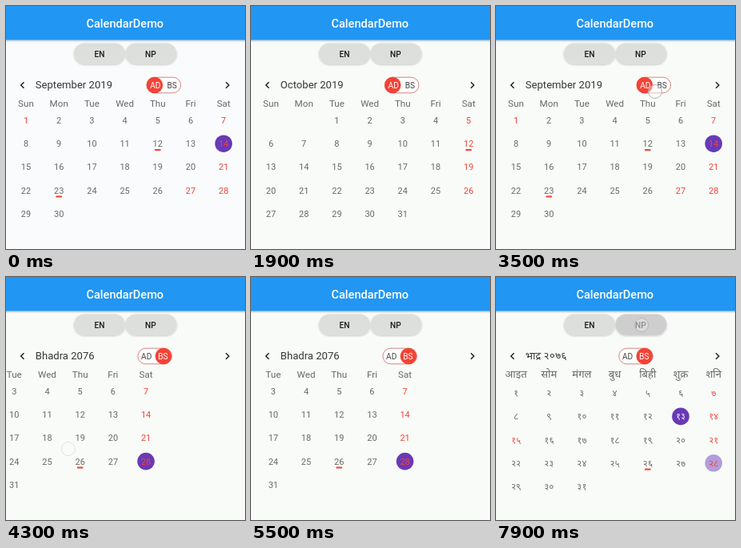
An HTML page for the animation above (8000 ms loop, 299 px wide and 304 px high).

```html
<!DOCTYPE html>
<html lang="en">
<head>
<meta charset="utf-8">
<title>Calendar</title>
<style>
  html, body { margin: 0; width: 100%; height: 100%; overflow: hidden; }
  svg { display: block; width: 299px; height: 304px; }
  text { font-family: Roboto, "Noto Sans Devanagari", "Noto Sans", sans-serif; }
</style>
</head>
<body>
<svg viewBox="0 0 299 304" xmlns="http://www.w3.org/2000/svg">
  <defs>
    <linearGradient id="shade" x2="0" y2="1">
      <stop stop-color="#000" stop-opacity=".2"/>
      <stop offset="1" stop-color="#000" stop-opacity="0"/>
    </linearGradient>
    <filter id="lift" x="-10%" y="-20%" width="120%" height="160%">
      <feDropShadow dx="0" dy=".9" stdDeviation=".8" flood-opacity=".24"/>
    </filter>
  </defs>
  <rect id="back" width="299" height="304"/>
  <rect y="42.6" width="299" height="3" fill="url(#shade)"/>
  <rect width="299" height="42.6" fill="#2196f3"/>
  <text x="148.8" y="27" text-anchor="middle" font-size="14.6" font-weight="500" fill="#fff">CalendarDemo</text>
  <g filter="url(#lift)">
    <rect x="85" y="46.5" width="64" height="26.2" rx="13.1" fill="#dddfdc"/>
    <rect id="np" x="149.5" y="46.5" width="64" height="26.2" rx="13.1"/>
  </g>
  <g font-size="10.2" font-weight="500" text-anchor="middle" fill="#1c1c1c">
    <text x="117" y="63.6">EN</text>
    <text id="npLabel" x="181" y="63.6">NP</text>
  </g>
  <path d="M22.5 95.2 18.7 99l3.8 3.8M275.1 95.2l3.8 3.8-3.8 3.8" fill="none" stroke="#1c1c1c" stroke-width="1.4"/>
  <text id="title" x="36.8" y="103.2" font-size="13.1" fill="#363636"></text>
  <g id="toggle" font-size="10.2" text-anchor="middle">
    <rect x=".5" y="89.2" width="42.5" height="19.6" rx="9.8" fill="#fff" stroke="#d4786d" stroke-width=".9"/>
    <circle id="knob" cy="99" r="10.3" fill="#f44336"/>
    <text id="ad" x="11.3" y="102.7">AD</text>
    <text id="bs" x="32" y="102.7">BS</text>
  </g>
  <g id="page" text-anchor="middle"></g>
  <circle id="touch" r="8.5" fill="#fff" fill-opacity=".4" stroke="#a9a9b4" stroke-width=".9"/>
</svg>
<script>
const LOOP = 8000, STEP = 100, WIDTH = 299, RED = '#f44336', GREY = '#686868';
const $ = id => document.getElementById(id);
const DAYS = {
  en: ['Sun', 'Mon', 'Tue', 'Wed', 'Thu', 'Fri', 'Sat'],
  np: ['आइत', 'सोम', 'मंगल', 'बुध', 'बिही', 'शुक्र', 'शनि']
};
const AD = [
  { en: 'September 2019', first: 0, days: 30, off: [1, 27], events: [12, 23], today: 14 },
  { en: 'October 2019', first: 2, days: 31, off: [], events: [12] }
];
const BS = [
  { en: 'Bhadra 2076', np: 'भाद्र २०७६', first: 0, days: 31, off: [15], events: [26], today: 28 },
  { en: 'Ashwin 2076', first: 3, days: 30, off: [10], events: [6, 25] }
];

// turn: +1 to the next page, -1 back; hold: how long the finger rests first
const SWIPES = [
  { start: 1300, time: 525, turn: 1, x: 152, y: 224, hold: 0 },
  { start: 2230, time: 600, turn: -1, x: 152, y: 187, hold: 50 },
  { start: 4100, time: 525, turn: 1, x: 152, y: 215, hold: 0 },
  { start: 5070, time: 650, turn: -1, x: 152, y: 205, hold: 200 }
];
const columnX = i => 25 + i * 41.2;
const rowY = i => 143 + i * 29.2;
const TAPS = {
  calendar: { start: 3500, x: 199, y: 107 },
  thursday: { start: 6100, x: columnX(4), y: rowY(3) },
  friday: { start: 6700, x: columnX(5), y: rowY(1) },
  language: { start: 7800, x: 182, y: 60 }
};

const clamp = v => Math.min(1, Math.max(0, v));
const smooth = v => (v = clamp(v)) * v * (3 - 2 * v);
const tapped = (tap, t) => t >= tap.start + STEP;
const digits = (n, lang) => lang === 'np'
  ? String(n).replace(/\d/g, d => String.fromCharCode(0x966 + +d)) : n;
const label = (x, y, size, fill, words) =>
  `<text x="${x}" y="${y}" font-size="${size}" fill="${fill}">${words}</text>`;
const set = (id, attributes) =>
  Object.entries(attributes).forEach(([name, value]) => $(id).setAttribute(name, value));

function monthMarkup(month, picked, lang) {
  const nepali = lang === 'np';
  let out = DAYS[lang].map((d, i) => label(columnX(i), 126, nepali ? 13.1 : 11.65, GREY, d)).join('');
  for (let day = 1; day <= month.days; day++) {
    const cell = day - 1 + month.first, x = columnX(cell % 7);
    const y = rowY(Math.floor(cell / 7)) + (nepali ? 2.2 : 0);
    const chosen = day === picked;
    const holiday = cell % 7 === 6 || month.off.includes(day);
    if (chosen || day === month.today)
      out += `<circle cx="${x}" cy="${y}" r="10.8" fill="${chosen ? '#673ab7' : '#b39ddb'}"/>`;
    if (month.events.includes(day))
      out += `<rect x="${x - 3.7}" y="${y + 6.8}" width="7.4" height="2.1" fill="${RED}"/>`;
    out += label(x, y + 3.9, 11, holiday ? RED : chosen ? '#fff' : GREY, digits(day, lang));
  }
  return out;
}

function fingerAt(t) {
  const tap = Object.values(TAPS).find(p => t >= p.start && t < p.start + 200);
  if (tap) return { x: tap.x, y: tap.y, opacity: 1 - (t - tap.start) / 300 };
  const swipe = SWIPES.find(s => t > s.start - s.hold && t < s.start + 300);
  if (!swipe) return null;
  const k = clamp((t - swipe.start) / 300);
  const reach = swipe.turn > 0 ? -100 : 197;
  return { x: swipe.x + reach * smooth(k), y: swipe.y, opacity: 1 - k };
}

function draw(t) {
  const pressed = t >= TAPS.language.start;
  const lang = tapped(TAPS.language, t) ? 'np' : 'en';
  set('back', { fill: t < 200 ? '#fafbfc' : '#f9fbf8' });
  set('np', { fill: pressed ? '#cecece' : '#dddfdc' });
  set('npLabel', { fill: pressed ? '#686868' : '#1c1c1c' });

  const progress = SWIPES.reduce((sum, s) => sum + s.turn * smooth((t - s.start) / s.time), 0);
  const index = Math.round(progress);
  const side = clamp((t - TAPS.calendar.start) / 200);
  const month = (side < 1 ? AD : BS)[index];
  const picked = tapped(TAPS.friday, t) ? 13 : tapped(TAPS.thursday, t) ? 26 : month.today;

  $('title').textContent = month[lang];
  const titleEnd = 37 + $('title').getComputedTextLength();
  set('toggle', { transform: `translate(${titleEnd / 2 + 109} 0)` });
  set('knob', { cx: 10.3 + 22.2 * side });
  set('ad', { fill: side < .5 ? '#fff' : '#444' });
  set('bs', { fill: side < .5 ? '#444' : '#fff' });

  // the second page stays empty until it has settled
  const loaded = index === 0 || progress > .999;
  set('page', { transform: `translate(${(index - progress) * WIDTH} 0)` });
  $('page').innerHTML = loaded ? monthMarkup(month, picked, lang) : '';

  const finger = fingerAt(t);
  set('touch', { visibility: finger ? 'visible' : 'hidden' });
  if (finger) set('touch', { cx: finger.x, cy: finger.y, opacity: finger.opacity });
}

let shown = -1;
const begin = performance.now();
function tick() {
  const t = Math.floor((performance.now() - begin) % LOOP / STEP) * STEP;
  if (t !== shown) draw(shown = t);
  requestAnimationFrame(tick);
}
tick();
</script>
</body>
</html>
```
